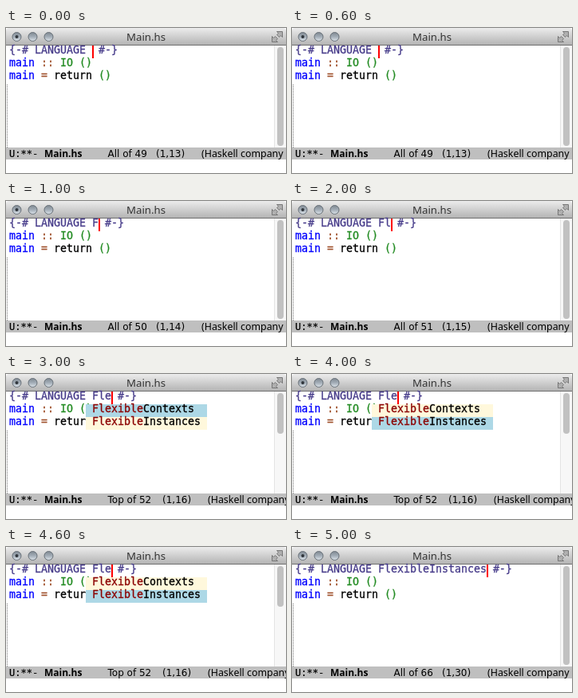
Animation of 351x182 px, one loop 6 s. Source, as an HTML page with a canvas:

```html
<!DOCTYPE html>
<html lang="en">
<head>
<meta charset="utf-8">
<title>Editor completion</title>
<style>
html, body { margin: 0; width: 100%; height: 100%; overflow: hidden; background: #fff; }
canvas { display: block; }
</style>
</head>
<body>
<canvas id="stage" width="351" height="182"></canvas>
<script>
const ctx = document.getElementById("stage").getContext("2d");
const CELL = 8, ROW = 16, LEFT = 4, TOP = 22, BASELINE = 10;
const MONO = "13.29px 'DejaVu Sans Mono', monospace";
const STATUS = "12px 'DejaVu Sans', sans-serif";
const PRAGMA = "#483d8b", NAME = "#0000ff", OPERATOR = "#a0522d", TYPE = "#228b22";

const steps = [
  { typed: "" },
  { typed: "F" },
  { typed: "Fl" },
  { typed: "Fle", selected: 0 },
  { typed: "Fle", selected: 1 },
  { typed: "FlexibleInstances" }
];

function rect(x, y, w, h, color) {
  ctx.fillStyle = color;
  ctx.fillRect(x, y, w, h);
}

// A thin stroke gives the glyphs a slightly heavier weight.
function text(string, x, y, font, color = "#000", weight = 0) {
  ctx.font = font;
  ctx.fillStyle = ctx.strokeStyle = color;
  ctx.fillText(string, x, y);
  if (weight) {
    ctx.lineWidth = weight;
    ctx.strokeText(string, x, y);
  }
}

function code(row, column, ...spans) {
  for (const [string, color] of spans) {
    text(string, LEFT + column * CELL, TOP + row * ROW + BASELINE, MONO, color, 0.3);
    column += string.length;
  }
}

function verticalGradient(y0, y1, ...colors) {
  const gradient = ctx.createLinearGradient(0, y0, 0, y1);
  colors.forEach((c, i) => gradient.addColorStop(i / (colors.length - 1), c));
  return gradient;
}

function circle(x, y, radius, fill) {
  ctx.beginPath();
  ctx.arc(x, y, radius, 0, Math.PI * 2);
  ctx.fillStyle = fill;
  ctx.fill();
}

function expandArrow(direction) {
  ctx.save();
  ctx.translate(340, 11);
  ctx.scale(direction, direction);
  ctx.beginPath();
  [[-0.5, -6.5], [6.5, -6.5], [6.5, 0.5], [4.5, -1.5], [2.5, 0.5], [-0.5, -2.5], [1.5, -4.5]]
    .forEach(([x, y]) => ctx.lineTo(x, y));
  ctx.closePath();
  ctx.fillStyle = "#b0b0b0";
  ctx.fill();
  ctx.strokeStyle = "#777";
  ctx.lineWidth = 1;
  ctx.stroke();
  ctx.restore();
}

function titleBar() {
  ctx.beginPath();
  ctx.roundRect(0, 0, 351, 22, [4, 4, 0, 0]);
  ctx.fillStyle = verticalGradient(0, 21, "#ececec", "#b4b4b4");
  ctx.fill();
  rect(0, 21, 351, 1, "#707070");
  for (const x of [13.5, 33.5, 53.5]) {
    circle(x, 11, 5.5, verticalGradient(5, 17, "#7c858e", "#a3adb7", "#e2e9ef"));
    ctx.strokeStyle = "#687078";
    ctx.lineWidth = 1;
    ctx.stroke();
  }
  circle(13.5, 11, 2, "#30363c");
  ctx.textAlign = "center";
  text("Main.hs", 175.5, 16, "13.2px 'Noto Sans', sans-serif", "#333");
  ctx.textAlign = "left";
  expandArrow(1);
  expandArrow(-1);
}

function scrollBar(thumbBottom) {
  rect(336, 22, 15, 128, "#f7f7f7");
  rect(336, 22, 1, 128, "#e4e4e4");
  ctx.beginPath();
  ctx.roundRect(340, 24, 8, thumbBottom - 24, 4);
  ctx.fillStyle = "#c1c1c1";
  ctx.fill();
}

function modeLine(size, column, popup) {
  const shift = popup ? 8 : 0;
  rect(0, 150, 351, 15, "#bfbfbf");
  text("U:**-", 4, 162, "12px 'DejaVu Sans Mono', monospace", "#000", 0.2);
  text("Main.hs", 48, 162, "bold 12px 'Noto Sans', sans-serif");
  text(`${popup ? "Top" : "All"} of ${size}`, 127.5, 162, STATUS);
  text(`(1,${column})`, 188 + shift, 162, STATUS);
  text("(Haskell company", 245 + shift, 162, "12.4px 'Noto Sans', sans-serif");
}

function completions(selected) {
  ["Contexts", "Instances"].forEach((ending, i) => {
    rect(100, 38 + i * ROW, 152, ROW, i === selected ? "#add8e6" : "#fff8dc");
    code(i + 1, 13, ["Flexible", "#8b0000"], [ending, "#000"]);
  });
}

function draw({ typed, selected }) {
  const popup = selected !== undefined;
  const column = 13 + typed.length;
  rect(0, 0, 351, 182, "#fff");
  titleBar();
  code(0, 0, [`{-# LANGUAGE ${typed} #-}`, PRAGMA]);
  code(1, 0, ["main", NAME], [" :: ", OPERATOR], ["IO ()", TYPE]);
  code(2, 0, ["main", NAME], [" = ", OPERATOR], ["return ", "#000"], ["()", TYPE]);
  for (let y = 71; y < 150; y += 2) rect(1, y, 1, 1, "#777");
  if (popup) completions(selected);
  rect(LEFT + column * CELL, TOP, 2, ROW, "#f00");
  scrollBar(popup ? 75 : 148);
  modeLine(49 + typed.length, column, popup);
}

function frame(now) {
  draw(steps[Math.floor(now / 1000) % steps.length]);
  requestAnimationFrame(frame);
}
requestAnimationFrame(frame);
</script>
</body>
</html>
```
